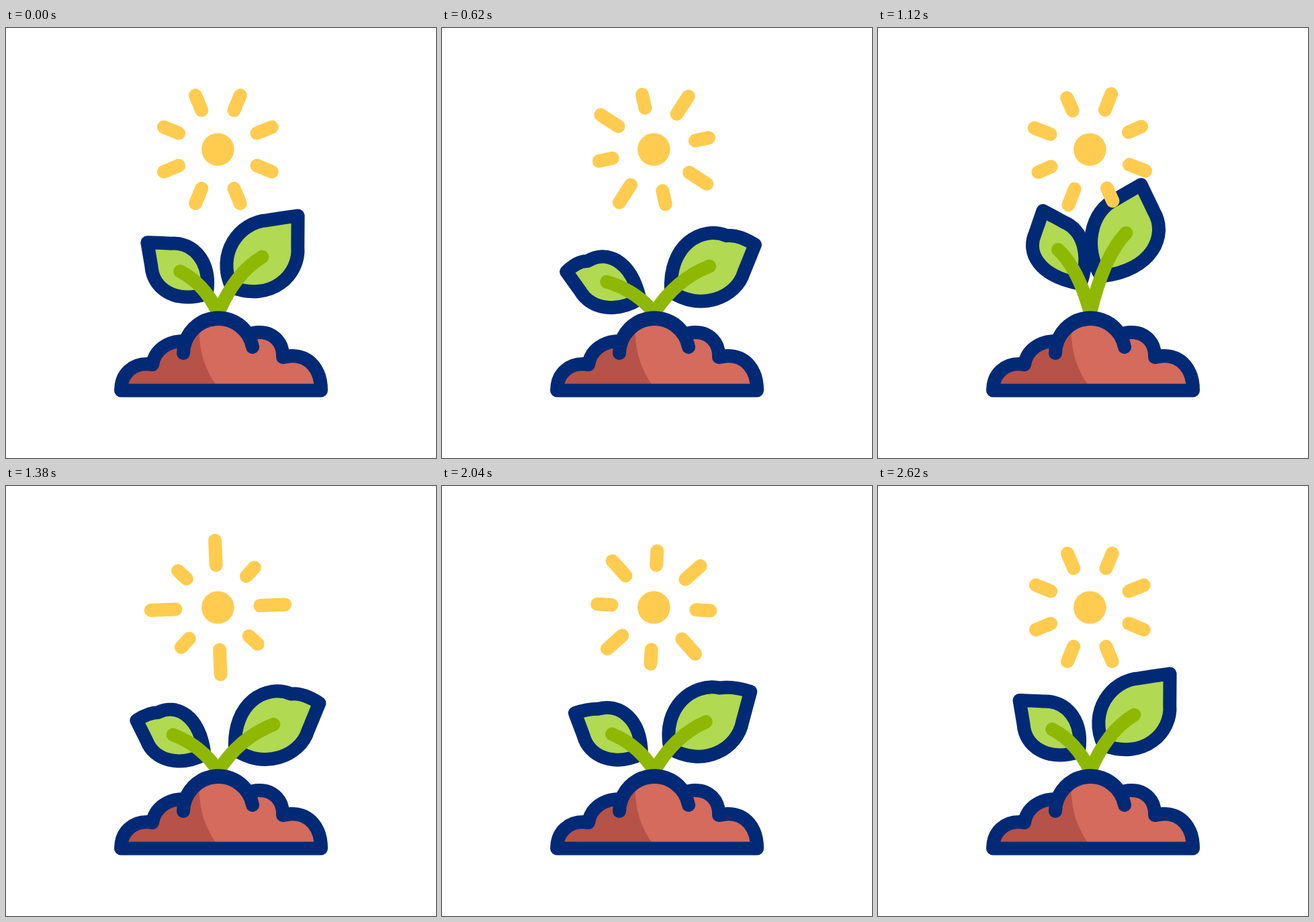
Animation, 640 px wide and 640 px high, one loop 3000 ms. Source, as an HTML page:

```html
<!DOCTYPE html>
<html lang="en">
<head>
<meta charset="utf-8">
<title>Sprout in the sun</title>
<style>
  html, body { margin: 0; width: 100%; height: 100%; overflow: hidden; background: #fff; }
  svg { display: block; width: 100vw; height: 100vh; }
  path { stroke-width: 20; stroke-linecap: round; stroke-linejoin: round; }
  .leaf { fill: #b1d952; stroke: #002a76; }
  .stem { fill: none; stroke: #8fb805; }
  .ray { stroke: #ffcc50; }
  .edge { fill: none; stroke: #002a76; }
</style>
</head>
<body>
<svg viewBox="0 0 640 640">
  <defs>
    <path id="mound" d="M171 539.5C171 513 190 500 210 500L218 501C221 480 240 465 267 466
      A52 52 0 0 1 361 457C366 454 371 453 377 453C398 453 413 468 412 490
      L425 488C452 488 469 508 469 539.5Z"/>
    <clipPath id="inside"><use href="#mound"/></clipPath>
  </defs>
  <g transform="translate(316 424) scale(-1 1)"><path class="leaf" id="leafL"/></g>
  <g transform="translate(316 424)"><path class="leaf" id="leafR"/></g>
  <g transform="translate(316 424) scale(-1 1)"><path class="stem" id="stemL"/></g>
  <g transform="translate(316 424)"><path class="stem" id="stemR"/></g>
  <use href="#mound" fill="#d46b5d"/>
  <path d="M160 420H290C284 455 288 497 312 530V550H160Z" fill="#b65248" clip-path="url(#inside)"/>
  <use href="#mound" class="edge"/>
  <path class="edge" d="M264 484A52 52 0 0 1 367 475"/>
  <circle cx="315.3" cy="180.7" r="24.3" fill="#ffcc50"/>
  <path class="ray" id="raysA"/>
  <path class="ray" id="raysB"/>
</svg>
<script>
const LOOP = 3000, START = 210, END = 2610;
const SUN = [315.3, 180.7];

// Key moments: lean bends the plant outwards, grow lengthens the stems, pulse drives the rays
const beats = [
  { time: START, lean: 0, grow: 0, pulse: 0 },
  { time: 500, lean: 1, grow: 0, pulse: .6 },
  { time: 1000, lean: -1, grow: .3, pulse: -.4 },
  { time: 1500, lean: 1, grow: 0, pulse: 1 },
  { time: 1800, lean: -.68, grow: 0, pulse: -.85 },
  { time: 2070, lean: .5, grow: 0, pulse: .4 },
  { time: 2400, lean: -.25, grow: 0, pulse: -.3 },
  { time: END, lean: 0, grow: 0, pulse: 0 }
];

const plants = {
  L: { stemAngle: 47.4, stemLength: 84, leafAngle: 41.3, leafLength: 65, width: .76, back: .62, delay: 30 },
  R: { stemAngle: 51.9, stemLength: 106, leafAngle: 49, leafLength: 81, width: 1, back: 1, delay: 0 }
};

const byId = id => document.getElementById(id);
const ease = p => p * p * (3 - 2 * p);
const progress = (t, a, b) => ease(Math.min(1, Math.max(0, (t - a) / (b - a))));
const mix = (a, b, p) => a + (b - a) * p;
const mixPoint = (a, b, p) => a.map((v, i) => mix(v, b[i], p));

// Polar point: angle up from the horizontal, in degrees
function polar(angle, length) {
  const a = angle * Math.PI / 180;
  return [length * Math.cos(a), -length * Math.sin(a)];
}

function span(t) {
  const i = Math.max(1, beats.findIndex((b, n) => t < b.time || n === beats.length - 1));
  const from = beats[i - 1], to = beats[i];
  return { from, to, p: progress(t, from.time, to.time) };
}

function drawPlant(side, t) {
  const plant = plants[side];
  const { from, to, p } = span(t - plant.delay);
  const blend = pose => mixPoint(pose(from), pose(to), p);

  // Stem end, and the vector from there to the leaf tip
  const [sx, sy] = blend(b => polar(plant.stemAngle - 18 * b.lean, plant.stemLength * (1 + b.grow)));
  const [dx, dy] = blend(b => polar(plant.leafAngle - 32 * b.lean, plant.leafLength));
  const ctrl = [.38 * sx, .71 * sy];
  byId('stem' + side).setAttribute('d', `M0 0Q${ctrl} ${sx} ${sy}`);

  const length = Math.hypot(dx, dy), ux = dx / length, uy = dy / length;
  const at = (along, across) => {
    const a = along * (along > 0 ? length / 81 : plant.back), b = across * plant.width;
    return [sx + a * ux - b * uy, sy + a * uy + b * ux];
  };
  const base = mixPoint(mixPoint([0, 0], ctrl, .36), mixPoint(ctrl, [sx, sy], .36), .36);
  const bulge = 14 * Math.max(0, mix(from.lean, to.lean, p));
  byId('leaf' + side).setAttribute('d',
    `M${base}C${at(-42, -55)} ${at(17, -60)} ${at(46, -30)}Q${at(64, -15 - bulge)} ${at(81, 0)}` +
    `L${at(46, 30)}C${at(17, 60)} ${at(-42, 55)} ${base}Z`);
}

function drawRays(id, degrees, outer) {
  let d = '';
  for (let i = 0; i < 4; i++) {
    const point = r => polar(90 - degrees - i * 90, r).map((v, n) => v + SUN[n]);
    d += `M${point(63)}L${point(outer)}`;
  }
  byId(id).setAttribute('d', d);
}

function draw(now) {
  const t = now % LOOP;
  drawPlant('L', t);
  drawPlant('R', t);
  const { from, to, p } = span(t);
  const pulse = mix(from.pulse, to.pulse, p);
  const turn = 135 * progress(t, START, END);
  drawRays('raysA', turn + 22.5, 87 + 16 * pulse);
  drawRays('raysB', turn - 22.5, 87 - 8 * pulse);
  requestAnimationFrame(draw);
}
requestAnimationFrame(draw);
</script>
</body>
</html>
```
